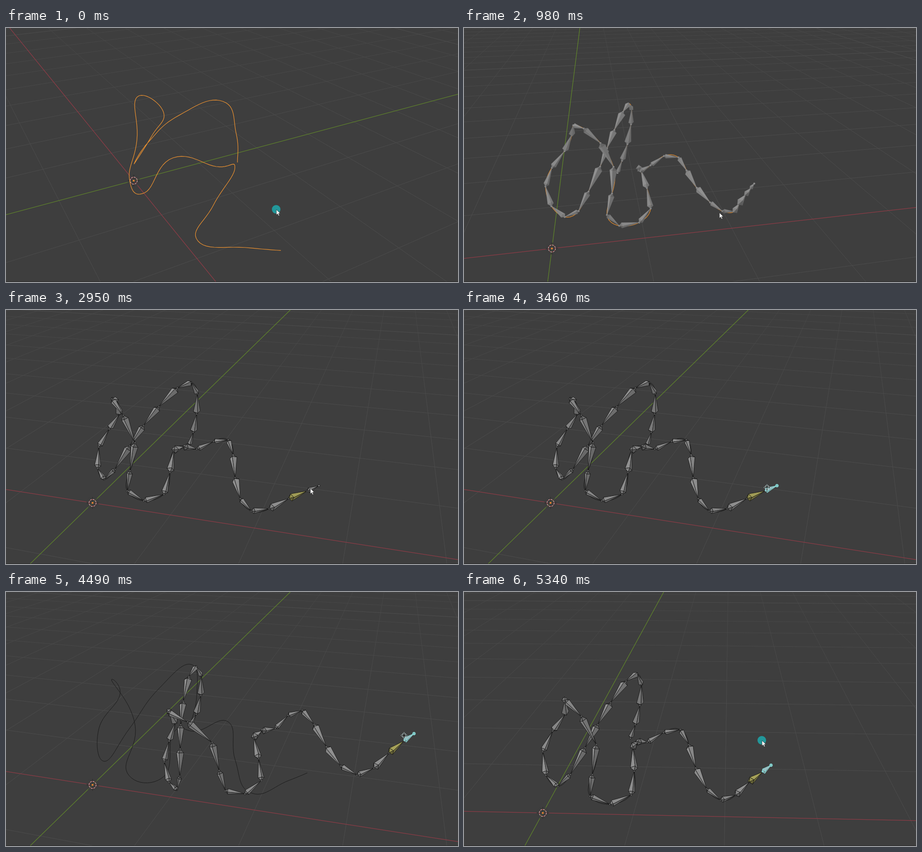
These frames come from a looping animation (998 by 561 pixels, 5.41 s). An HTML page with a canvas:

```html
<!DOCTYPE html>
<html lang="en">
<head>
<meta charset="utf-8">
<title>Bone chain on a curve</title>
<style>
  html, body { margin: 0; width: 100%; height: 100%; overflow: hidden; background: #3e3e3e; }
  canvas { display: block; }
</style>
</head>
<body>
<canvas id="stage" width="998" height="561"></canvas>
<script>
const ctx = document.getElementById('stage').getContext('2d');
const W = 998, H = 561, LOOP = 5410, BG = '#3e3e3e', INK = '#161616';
const FOCAL = 1120, CX = 545, CY = 280, DISTANCE = 6.3;
const RAD = Math.PI / 180;

const lerp = (a, b, s) => a + (b - a) * s;
const mix = (p, q, s) => p.map((v, i) => lerp(v, q[i], s));
const clamp = s => Math.max(0, Math.min(1, s));
const ease = s => lerp(s, s * s * (3 - 2 * s), 0.6);
const stepped = (t, start, count) => clamp((Math.floor((t - start) / 70) + 1) / count);
const list = (count, make) => Array.from({ length: count }, (_, i) => make(i));

// Orbit cameras: yaw, pitch (degrees), pivot x, y, z
const VIEWS = [
  [58.6, 26.57, 1.259, 1.159, 0.635],
  [-12.6, 21.45, 1.92, 0.754, 0.63],
  [14.9, 24.9, 1.707, 1.027, 0.614],
  [1.93, 26.03, 1.809, 1.166, 0.613],
];

function cameraAt(t) {
  const orbit = (i, s) => mix(VIEWS[i], VIEWS[i + 1], ease(s));
  if (t < 2380) return orbit(0, stepped(t, 60, 8));
  if (t < 4710) return orbit(1, stepped(t, 2380, 8));
  return orbit(2, stepped(t, 4710, 10));
}

const trig = ([yaw, pitch]) => [Math.cos(yaw * RAD), Math.sin(yaw * RAD), Math.cos(pitch * RAD), Math.sin(pitch * RAD)];

function toCamera(cam, [x, y, z]) {
  const [cy, sy, cp, sp] = trig(cam);
  const dx = x - cam[2], dy = y - cam[3], dz = z - cam[4];
  const ahead = dy * cy - dx * sy;
  return [dx * cy + dy * sy, ahead * sp + dz * cp, DISTANCE + ahead * cp - dz * sp];
}
const toScreen = ([x, y, depth]) => [CX + FOCAL * x / depth, CY - FOCAL * y / depth, depth];
const project = (cam, point) => toScreen(toCamera(cam, point));

function toWorld(cam, [x, y, depth]) {
  const [cy, sy, cp, sp] = trig(cam);
  const right = (x - CX) * depth / FOCAL, up = (CY - y) * depth / FOCAL, far = depth - DISTANCE;
  const ahead = up * sp + far * cp;
  return [cam[2] + right * cy - ahead * sy, cam[3] + right * sy + ahead * cy, cam[4] + up * cp - far * sp];
}

// Key points of the curve (x, y, depth as seen in the third view), one per two bones
const KEYS = [
  [405, 298, 6.81], [421, 229, 6.46], [409, 160, 6.08], [337, 214, 5.77], [273, 301, 5.68],
  [217, 374, 5.82], [205, 302, 6.1], [251, 229, 5.94], [234, 197, 5.44], [285, 294, 5.4],
  [268, 400, 5.54], [349, 407, 5.48], [371, 309, 5.69], [422, 307, 6.24], [491, 287, 6.13],
  [506, 371, 5.85], [542, 444, 5.56], [625, 416, 5.92], [691, 388, 6.28],
].map(key => toWorld(VIEWS[2], key));
const BONES = 36;

// Point on the curve at a position counted in bones
function curvePoint(position) {
  const last = KEYS.length - 1, u = position / 2;
  const i = Math.min(last - 1, Math.floor(u)), f = u - i;
  const key = k => KEYS[Math.max(0, Math.min(last, k))];
  const tension = 0.7, f2 = f * f, f3 = f2 * f;
  return key(i).map((a, k) => {
    const b = key(i + 1)[k];
    const ta = tension * (b - key(i - 1)[k]), tb = tension * (key(i + 2)[k] - a);
    return a + (b - a) * (3 * f2 - 2 * f3) + ta * (f3 - 2 * f2 + f) + tb * (f3 - f2);
  });
}

// Pull of the tip: negative to the left, positive to the right
function pullAt(t) {
  if (t < 3530 || t >= 4710) return 0;
  const swing = Math.min(15, Math.floor((t - 3530) / 73.8)) - 5.8;
  return swing < 0 ? 1.35 * Math.sin(Math.PI * swing / 6.5) : 1.4 * Math.sin(Math.PI * swing / 9.6);
}

// Shift of every quarter of the chain at full pull
const LEFT = [[0, 0], [-78, -108], [-126, -120], [-129, -69], [-201, -32]];
const RIGHT = [[0, 0], [145, 56], [172, 39], [166, -18], [212, -76]];

// Bones swing stiffly around the fixed root, then drift so that the quarter points are reached
function pullChain(rest, pull) {
  const bent = [rest[0]], shifts = pull < 0 ? LEFT : RIGHT, quarter = BONES / 4;
  for (let i = 1; i <= BONES; i++) {
    const angle = -24 * RAD * pull * Math.min(1, i / 6);
    const dx = rest[i][0] - rest[i - 1][0], dy = rest[i][1] - rest[i - 1][1];
    bent.push([bent[i - 1][0] + dx * Math.cos(angle) - dy * Math.sin(angle),
      bent[i - 1][1] + dx * Math.sin(angle) + dy * Math.cos(angle), rest[i][2]]);
  }
  const drift = shifts.map((shift, n) =>
    shift.map((v, k) => rest[n * quarter][k] + v * Math.abs(pull) - bent[n * quarter][k]));
  return bent.map(([x, y, depth], i) => {
    const n = Math.min(3, Math.floor(i / quarter));
    const [dx, dy] = mix(drift[n], drift[n + 1], i / quarter - n);
    return [x + dx, y + dy, depth];
  });
}

function path(points, close) {
  ctx.beginPath();
  points.forEach(p => ctx.lineTo(p[0], p[1]));
  if (close) ctx.closePath();
}
function strokePath(points, color, width, close) {
  path(points, close);
  ctx.strokeStyle = color;
  ctx.lineWidth = width;
  ctx.stroke();
}
function shape(points, fill, line, width) {
  path(points, true);
  ctx.fillStyle = fill;
  ctx.fill();
  strokePath(points, line, width, true);
}
function disc(x, y, r, fill, line) {
  ctx.beginPath();
  ctx.arc(x, y, r, 0, 7);
  if (fill) { ctx.fillStyle = fill; ctx.fill(); }
  if (line) { ctx.strokeStyle = line; ctx.lineWidth = 1; ctx.stroke(); }
}

function groundLine(cam, from, to, color, width) {
  const near = 0.1;
  let a = toCamera(cam, [...from, 0]), b = toCamera(cam, [...to, 0]);
  if (a[2] < near && b[2] < near) return;
  if (a[2] < near) a = mix(a, b, (near - a[2]) / (b[2] - a[2]));
  if (b[2] < near) b = mix(b, a, (near - b[2]) / (a[2] - b[2]));
  strokePath([toScreen(a), toScreen(b)], color, width);
}

function drawGround(cam) {
  const far = 50;
  for (let i = -far; i <= far; i++) {
    if (!i) continue;
    const color = i % 10 ? '#4c4c4c' : '#555';
    groundLine(cam, [i, -far], [i, far], color, 1);
    groundLine(cam, [-far, i], [far, i], color, 1);
  }
  const fade = ctx.createLinearGradient(0, 0, 0, 260);
  fade.addColorStop(0, 'rgba(62,62,62,.4)');
  fade.addColorStop(1, 'rgba(62,62,62,0)');
  ctx.fillStyle = fade;
  ctx.fillRect(0, 0, W, 260);
  groundLine(cam, [-far, 0], [far, 0], '#8f3b46', 1.3);
  groundLine(cam, [0, -far], [0, far], '#5f842b', 1.3);
  drawOrigin(...project(cam, [0, 0, 0]));
}

const SIDES = [[1, 0], [0, 1], [-1, 0], [0, -1]];

function drawOrigin(x, y) {
  disc(x, y, 14, 'rgba(62,62,62,.65)');
  for (const [dx, dy] of SIDES)
    strokePath([[x + dx * 5, y + dy * 5], [x + dx * 13, y + dy * 13]], 'rgba(20,20,20,.5)', 1);
  disc(x, y, 7.8, null, '#c8484c');
  ctx.setLineDash([3.1, 3.1]);
  disc(x, y, 7.8, null, '#f0f0f0');
  ctx.setLineDash([]);
  disc(x, y, 2, '#f08a30');
}

// An octahedron: a square ring near the head, tapering to the tail
function drawBone(head, tail, tint, line) {
  const dx = tail[0] - head[0], dy = tail[1] - head[1];
  const flat = Math.hypot(dx, dy) || 1;
  const deep = (tail[2] - head[2]) * FOCAL / head[2];
  const size = Math.min(60, Math.hypot(flat, deep)), tilt = deep / Math.hypot(flat, deep);
  const u = [dx / flat, dy / flat], n = [-u[1], u[0]];
  const ring = [head[0] + dx * 0.12, head[1] + dy * 0.12];
  const corners = list(4, i => {
    const angle = 0.3 + i * Math.PI / 2;
    const across = 0.14 * size * Math.cos(angle), along = -0.14 * size * tilt * Math.sin(angle);
    return [0, 1].map(k => ring[k] + n[k] * across + u[k] * along);
  });
  for (const [apex, facing, level] of [[tail, -1, 124], [head, 1, 112]]) {
    corners.forEach((a, i) => {
      const b = corners[(i + 1) % 4];
      const cross = (a[0] - apex[0]) * (b[1] - apex[1]) - (a[1] - apex[1]) * (b[0] - apex[0]);
      if (cross * facing <= 0) return;
      const light = ring[0] * 2 + ring[1] * 3 - (a[0] + b[0]) - (a[1] + b[1]) * 1.5;
      const gray = level + Math.max(-20, Math.min(20, light * 2));
      const fill = `rgb(${tint.map(k => Math.round(gray * k))})`;
      shape([apex, a, b], fill, line || fill, line ? 0.9 : 0.5);
    });
  }
}

function drawChain(joints, posed, selected) {
  const last = joints.length - 1, ink = posed ? INK : null;
  disc(joints[0][0], joints[0][1], 2.2, '#8c8c8c', ink);
  for (let i = 0; i < last; i++) {
    const active = selected && i === last - 1, solver = posed && i === last - 2;
    const tint = active ? [1.15, 1.35, 1.38] : solver ? [1.15, 1.12, 0.62] : [1, 1, 1];
    const line = active ? '#8ae6e2' : ink;
    drawBone(joints[i], joints[i + 1], tint, line);
    const [x, y] = joints[i + 1];
    disc(x, y, active ? 3.2 : 2.2, active ? '#7fc4c2' : '#8c8c8c', line);
  }
}

function drawArrow(x, y, pressed) {
  if (pressed) disc(x - 0.5, y - 0.5, 9.5, '#22979a');
  const outline = [[0, 0], [0, 12], [2.8, 9.4], [4.8, 14], [6.8, 13.1], [4.8, 8.7], [8.6, 8.7]];
  shape(outline.map(p => [x + p[0], y + p[1]]), '#fff', '#333', 0.8);
}

function drawMoveCursor(x, y) {
  disc(x, y, 2, null, INK);
  for (const [dx, dy] of SIDES) {
    const at = (along, side) => [x + dx * along - dy * side, y + dy * along + dx * side];
    shape([at(7, 0), at(3.5, 3), at(3.5, -3)], INK, '#d8eeee', 0.8);
  }
}

function drawPointer(t, tip) {
  const drag = (from, to, s) => drawArrow(...mix(from, to, s), true);
  if (t < 560) drag([597, 401], [588, 403], stepped(t, 60, 8));
  else if (t < 630) drawArrow(588, 403);
  else if (t < 700) drawArrow(480, 150);
  else if (t < 910) return;
  else if (t < 980) drawArrow(520, 90);
  else if (t < 1270) drawArrow(lerp(564, 505, stepped(t, 1130, 2)), 408);
  else if (t < 2380) return;
  else if (t < 2950) drag([730, 390], [672, 394], stepped(t, 2380, 8));
  else if (t < 3100) drawArrow(672, 394);
  else if (t < 4710) drawMoveCursor(tip[0] - 22, tip[1] + 4);
  else drag([612, 338], [658, 328], stepped(t, 4710, 10));
}

function draw(t) {
  ctx.fillStyle = BG;
  ctx.fillRect(0, 0, W, H);
  ctx.lineJoin = 'round';
  const cam = cameraAt(t), posed = t >= 2160;
  drawGround(cam);

  // The curve ends one bone before the tip of the chain
  const curve = list(BONES * 6 - 5, i => project(cam, curvePoint(i / 6)));
  strokePath(curve, posed ? '#1b1b1b' : '#f0932f', posed ? 1 : 1.2);

  const bones = posed ? BONES : 42 - Math.round(6 * stepped(t, 1570, 6));
  const rest = list(bones + 1, i => project(cam, curvePoint(i * BONES / bones)));
  const pull = pullAt(t), joints = pull ? pullChain(rest, pull) : rest;
  if (t >= 910) drawChain(joints, posed, t >= 3030);
  drawPointer(t, joints[bones]);

  ctx.fillStyle = '#2b2b2b';
  ctx.fillRect(0, H - 1, W, 1);
}

const start = performance.now();
function tick() {
  draw((performance.now() - start) % LOOP);
  requestAnimationFrame(tick);
}
tick();
</script>
</body>
</html>
```
